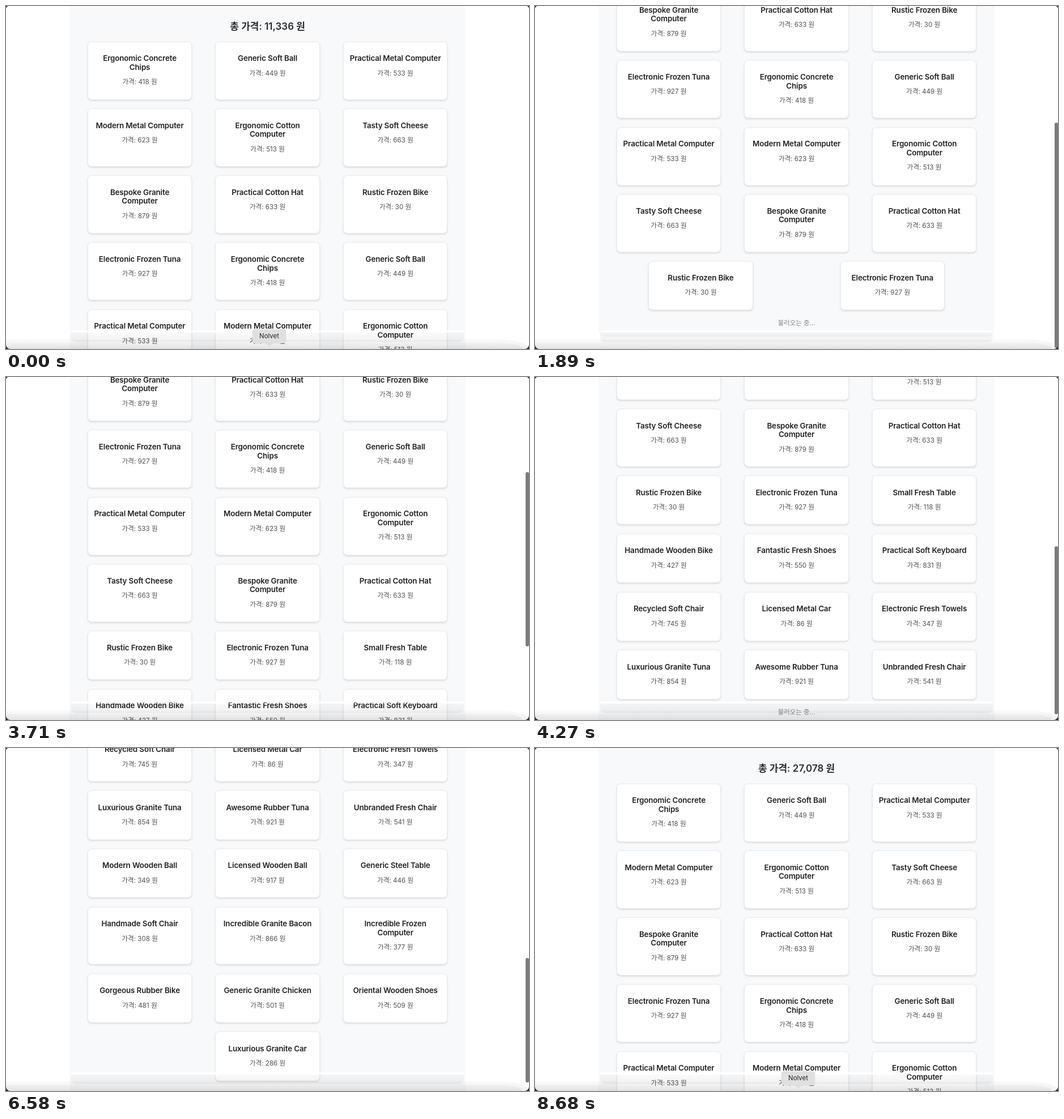
These frames come from a looping animation (923 px wide and 606 px high, 9.03 s). An HTML page:

```html
<!DOCTYPE html>
<html lang="ko">
<head>
<meta charset="utf-8">
<title>Product list</title>
<style>
  html, body { margin: 0; width: 100%; height: 100%; overflow: hidden; background: #2a2a2a; }
  #stage {
    position: absolute; left: 0; top: 0; width: 923px; height: 606px; overflow: hidden;
    background: #fff; border-radius: 5px 5px 8px 8px;
    font-family: Inter, "Noto Sans CJK KR", "Noto Sans CJK", sans-serif; text-align: center;
  }
  #page {
    position: absolute; left: 115.3px; top: -3px; width: 692.6px; box-sizing: border-box;
    padding: 0 8px 12px; border-radius: 8px; background: #f7f9fb;
    box-shadow: 0 1px 5px rgba(0, 0, 0, .09);
  }
  h1 { margin: 0; padding-top: 28px; height: 30.1px; font-size: 17px; line-height: 22px; font-weight: 600; color: #2d2d2d; }
  #list { display: flex; flex-wrap: wrap; justify-content: space-around; }
  .card {
    box-sizing: border-box; width: 184.3px; min-height: 87.3px; margin: 7.7px; padding: 21.6px 0 21.7px;
    border: 1px solid #e9eaec; border-radius: 7px; background: #fff;
    box-shadow: 0 1.5px 3px rgba(0, 0, 0, .13);
  }
  h2, p { margin: 0; line-height: 15.6px; white-space: pre; }
  h2 { font-size: 13.4px; font-weight: 600; letter-spacing: -.01em; color: #222; }
  p { font-size: 11.6px; color: #505050; }
  .card p { margin-top: 10.8px; }
  #loader { margin-top: 8.2px; font-size: 11.4px; color: #858585; }
  #bar { position: absolute; left: 916.5px; width: 6px; border-radius: 3px; background: #7b7b7b; }
  .shade { position: absolute; }
  #gleam { left: 115px; top: 573px; width: 693px; height: 4px; background: #fff; mix-blend-mode: overlay; }
  #ledge {
    left: 115px; top: 577px; width: 693px; height: 17px; border-radius: 0 0 8px 8px;
    background: linear-gradient(rgba(0, 0, 0, .02), rgba(0, 0, 0, .05));
  }
  .floor { left: 0; bottom: 0; background: linear-gradient(rgba(0, 0, 0, .02), rgba(0, 0, 0, .06)); }
  #tip { position: absolute; left: 435px; top: 571px; width: 59px; height: 31px; }
  #tip span {
    position: absolute; inset: 0 0 6px; border-radius: 5px; background: #e0e0e0;
    box-shadow: 0 0 1px rgba(0, 0, 0, .35); font-size: 11.4px; line-height: 24px; color: #222;
  }
  #tip i {
    position: absolute; left: 23px; top: 25px; width: 13px; height: 6px;
    background: #e0e0e0; clip-path: polygon(0 0, 100% 0, 50% 100%);
  }
</style>
</head>
<body>
<div id="stage">
  <div id="page">
    <h1 id="total"></h1>
    <div id="list"></div>
    <p id="loader">불러오는 중...</p>
  </div>
  <div class="shade" id="gleam"></div>
  <div class="shade" id="ledge"></div>
  <div class="shade floor" style="width:923px;height:17px;border-top-right-radius:55px 17px"></div>
  <div class="shade floor" style="width:912px;height:11px;border-top-right-radius:40px 11px"></div>
  <div id="bar"></div>
  <div id="tip"><i></i><span>Nolvet</span></div>
</div>
<script>
const LOOP = 9030, TICK = 70, FADE = 350;
const VIEW = 595, TRACK = 604;
const PAGE_EXTRA = 47, LOADER_SPACE = 43;

// A bar in a name marks its line break.
const firstTen = [
  'Ergonomic Concrete|Chips 418', 'Generic Soft Ball 449', 'Practical Metal Computer 533',
  'Modern Metal Computer 623', 'Ergonomic Cotton|Computer 513', 'Tasty Soft Cheese 663',
  'Bespoke Granite|Computer 879', 'Practical Cotton Hat 633', 'Rustic Frozen Bike 30',
  'Electronic Frozen Tuna 927'
];
const products = [
  ...firstTen, ...firstTen,
  'Small Fresh Table 118', 'Handmade Wooden Bike 427', 'Fantastic Fresh Shoes 550',
  'Practical Soft Keyboard 831', 'Recycled Soft Chair 745', 'Licensed Metal Car 86',
  'Electronic Fresh Towels 347', 'Luxurious Granite Tuna 854', 'Awesome Rubber Tuna 921',
  'Unbranded Fresh Chair 541',
  'Modern Wooden Ball 349', 'Licensed Wooden Ball 917', 'Generic Steel Table 446',
  'Handmade Soft Chair 308', 'Incredible Granite Bacon 866', 'Incredible Frozen|Computer 377',
  'Gorgeous Rubber Bike 481', 'Generic Granite Chicken 501', 'Oriental Wooden Shoes 509',
  'Luxurious Granite Car 286'
];

// A skew above 1 gives a longer tail; the scrollbar starts to fade at rest.
const gestures = [
  { start: 850, end: 1825, distance: 310.6, skew: 1, rest: 2170 },
  { start: 3640, end: 4620, distance: 308, skew: 1.8, rest: 4550 },
  { start: 5880, end: 6580, distance: 386.8, skew: 1, rest: 7140 },
  { start: 7140, end: 8050, distance: -1005.4, skew: 1.5, rest: 7840 }
];
const loads = [{ from: 1750, to: 3290 }, { from: 4200, to: 5530 }, { from: 6300, to: 7700 }];

const $ = id => document.getElementById(id);
const clamp = x => Math.min(1, Math.max(0, x));
const progress = (t, from, to) => clamp((t - from) / (to - from));
const smooth = u => u * u * (3 - 2 * u);

const cards = products.map(product => {
  const [, name, price] = product.match(/(.+) (\d+)$/);
  const card = document.createElement('div');
  card.className = 'card';
  card.innerHTML = `<h2>${name.replace('|', '\n')}</h2><p>가격: ${price} 원</p>`;
  $('list').append(card);
  return card;
});

function scrollAt(t) {
  const bounce = 11.4 * Math.sin(Math.PI * Math.sqrt(progress(t, 1820, 2240)));
  return gestures.reduce((sum, { start, end, distance, skew }) =>
    sum + distance * smooth(1 - (1 - progress(t, start, end)) ** skew), bounce);
}

function barOpacity(t) {
  const latest = gestures.filter(gesture => t > gesture.start).pop();
  return latest ? 1 - progress(t, latest.rest, latest.rest + FADE) : 0;
}

function draw(t) {
  const scroll = scrollAt(t);
  const count = 20 + 10 * loads.filter(load => t >= load.to).length;
  const loading = loads.some(load => t >= load.from && t < load.to);

  cards.forEach((card, i) => card.style.display = i < count ? '' : 'none');
  $('total').textContent = `총 가격: ${count === 20 ? '11,336' : '27,078'} 원`;
  $('loader').style.visibility = loading ? 'visible' : 'hidden';
  $('page').style.transform = `translateY(${-scroll}px)`;

  const height = $('list').offsetHeight + PAGE_EXTRA + (loading ? LOADER_SPACE : 0);
  const length = VIEW * TRACK / height;
  const bar = $('bar').style;
  bar.height = length + 'px';
  bar.top = Math.min(scroll * TRACK / height, TRACK - length) + 'px';
  bar.opacity = barOpacity(t);
  $('tip').style.opacity = t >= 8680 ? 1 : 1 - progress(t, TICK, TICK + FADE);
}

function frame() {
  const t = performance.now() % LOOP;
  draw(Math.floor(t / TICK) * TICK);
  requestAnimationFrame(frame);
}
frame();
</script>
</body>
</html>
```
